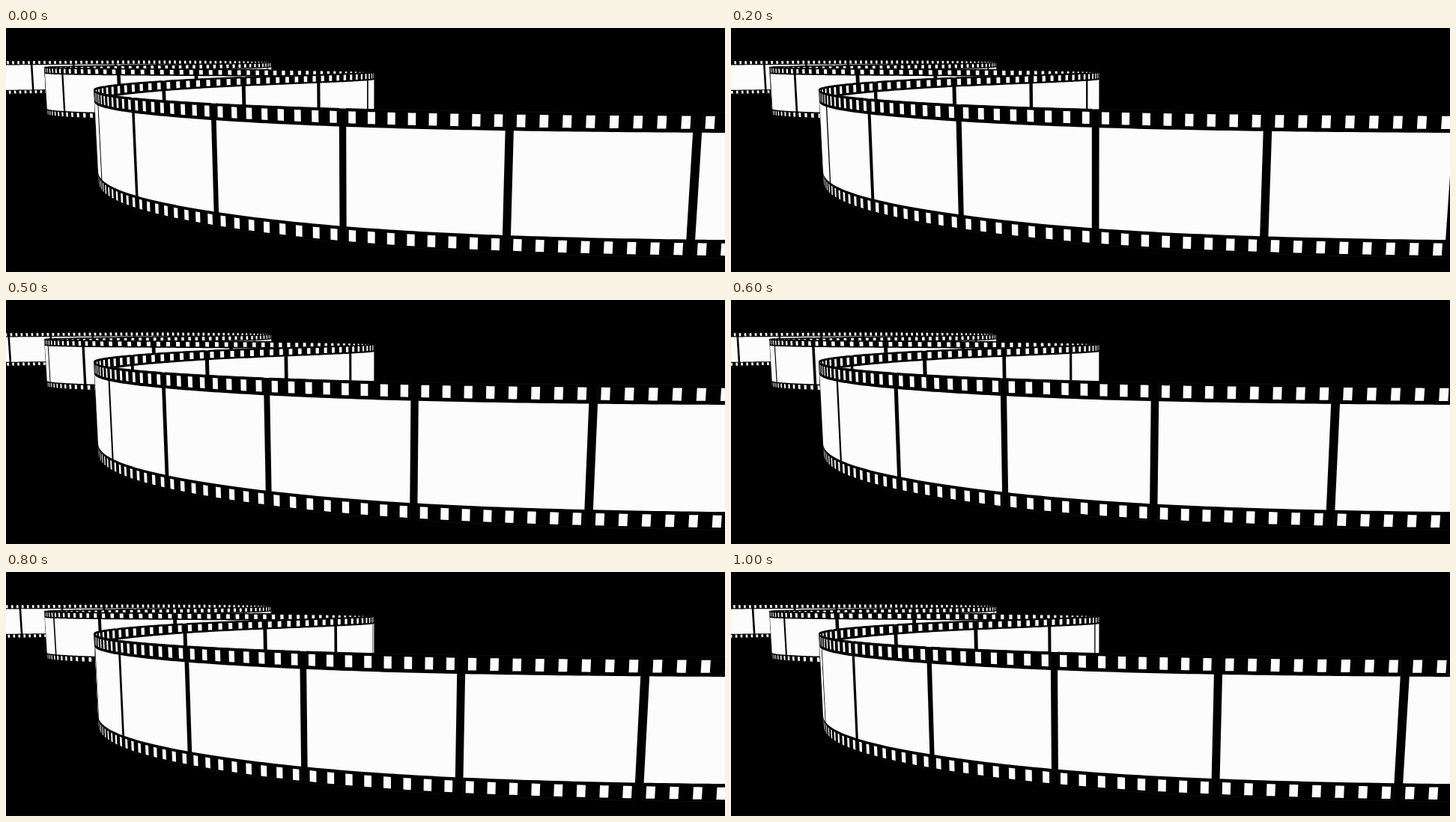
Recreate the animation shown at these times as an HTML page with a canvas. Size 960x326 px, loop 1.1 s.

```html
<!DOCTYPE html>
<html lang="en">
<head>
<meta charset="utf-8">
<title>Film strip</title>
<style>
  html, body { margin: 0; height: 100%; overflow: hidden; background: #000; }
  canvas { display: block; filter: blur(0.5px); }
</style>
</head>
<body>
<canvas id="stage" width="960" height="326"></canvas>
<script>
const ctx = document.getElementById('stage').getContext('2d');

// Upper edge of the film, far end first: u counts pictures along the film,
// dx and dy are the slopes there. The film bends where dx is 0.
const keys = [
  { u: -28,    x: -22,   y: 43.5,  dx: 55.5, dy: -0.2 },
  { u: -23,    x: 256,   y: 42.9,  dx: 54,   dy: 0.4 },
  { u: -20.4,  x: 354,   y: 45.5,  dx: 0,    dy: 2 },
  { u: -18,    x: 228,   y: 48.7,  dx: -72,  dy: 1.1 },
  { u: -14.95, x: 51.5,  y: 52.3,  dx: 0,    dy: 1.1 },
  { u: -13,    x: 150,   y: 54.2,  dx: 101,  dy: 0.6 },
  { u: -8.45,  x: 491.3, y: 58.6,  dx: 0,    dy: 1.9 },
  { u: -6,     x: 317,   y: 65.5,  dx: -105, dy: 3.5 },
  { u: -3.45,  x: 117.5, y: 82,    dx: 0,    dy: 8 },
  { u: -1,     x: 276.7, y: 100.8, dx: 142,  dy: 7.5 },
  { u: 0.5,    x: 556,   y: 110,   dx: 225,  dy: 4.2 },
  { u: 2.5,    x: 1054,  y: 114.2, dx: 258,  dy: 0.6 }
];
const first = keys[0], last = keys[keys.length - 1];
const cuts = keys.filter(k => k === first || k === last || k.dx === 0).map(k => k.u);

const HORIZON = 22, STEPS = 11, HOLES = 8;
const GAP = 0.0235, HOLE = 0.0475;
const PICTURE = [0.135, 0.876];
const ROWS = [[0.02, 0.109], [0.9, 0.985]];

function hermite(p0, p1, m0, m1, s) {
  const r = 1 - s;
  return r * r * ((1 + 2 * s) * p0 + s * m0) + s * s * ((3 - 2 * s) * p1 - r * m1);
}

// v runs from 0 at the upper edge of the film to 1 at the lower edge.
function project(u, v) {
  const i = Math.max(1, keys.findIndex(k => k.u >= u));
  const a = keys[i - 1], b = keys[i], len = b.u - a.u, s = (u - a.u) / len;
  const x = hermite(a.x, b.x, a.dx * len, b.dx * len, s);
  const y = hermite(a.y, b.y, a.dy * len, b.dy * len, s);
  const drop = 2.1 * (y - HORIZON) * v;
  return [x - 0.00014 * (x - 480) * drop, y + drop];
}

function patch(u0, u1, [v0, v1], parts) {
  const at = i => u0 + (u1 - u0) * i / parts;
  ctx.beginPath();
  for (let i = 0; i <= parts; i++) ctx.lineTo(...project(at(i), v0));
  for (let i = parts; i >= 0; i--) ctx.lineTo(...project(at(i), v1));
  ctx.closePath();
}

function drawPart(from, to, shift) {
  const cell = (u0, u1, span, parts) => {
    u0 = Math.max(u0, from);
    u1 = Math.min(u1, to);
    if (u0 >= u1) return;
    patch(u0, u1, span, parts);
    ctx.fill();
  };
  ctx.fillStyle = '#000';
  cell(from, to, [0, 1], 150);
  ctx.strokeStyle = '#0e0e0e';
  for (let k = Math.floor(from) - 1; k <= to; k++) {
    const start = k + shift, left = start + GAP, right = start + 1 - GAP;
    ctx.fillStyle = '#000';
    if (left >= from && left < to) {
      cell(left, right, [0, 1], 20);
      ctx.stroke();
    }
    ctx.fillStyle = '#fcfcfc';
    cell(left, right, PICTURE, 20);
    for (let h = 0; h < HOLES; h++) {
      const mid = start + (h + 0.5) / HOLES;
      for (const row of ROWS) cell(mid - HOLE / 2, mid + HOLE / 2, row, 2);
    }
  }
}

function draw(now) {
  const shift = Math.floor(now / 100) % STEPS / STEPS;
  ctx.fillStyle = '#000';
  ctx.fillRect(0, 0, 960, 326);
  ctx.fillStyle = '#080004';
  ctx.fillRect(0, 323, 960, 3);
  for (let i = 1; i < cuts.length; i++) drawPart(cuts[i - 1], cuts[i], shift);
}

const began = performance.now();
function tick() {
  draw(performance.now() - began);
  requestAnimationFrame(tick);
}
tick();
</script>
</body>
</html>
```
